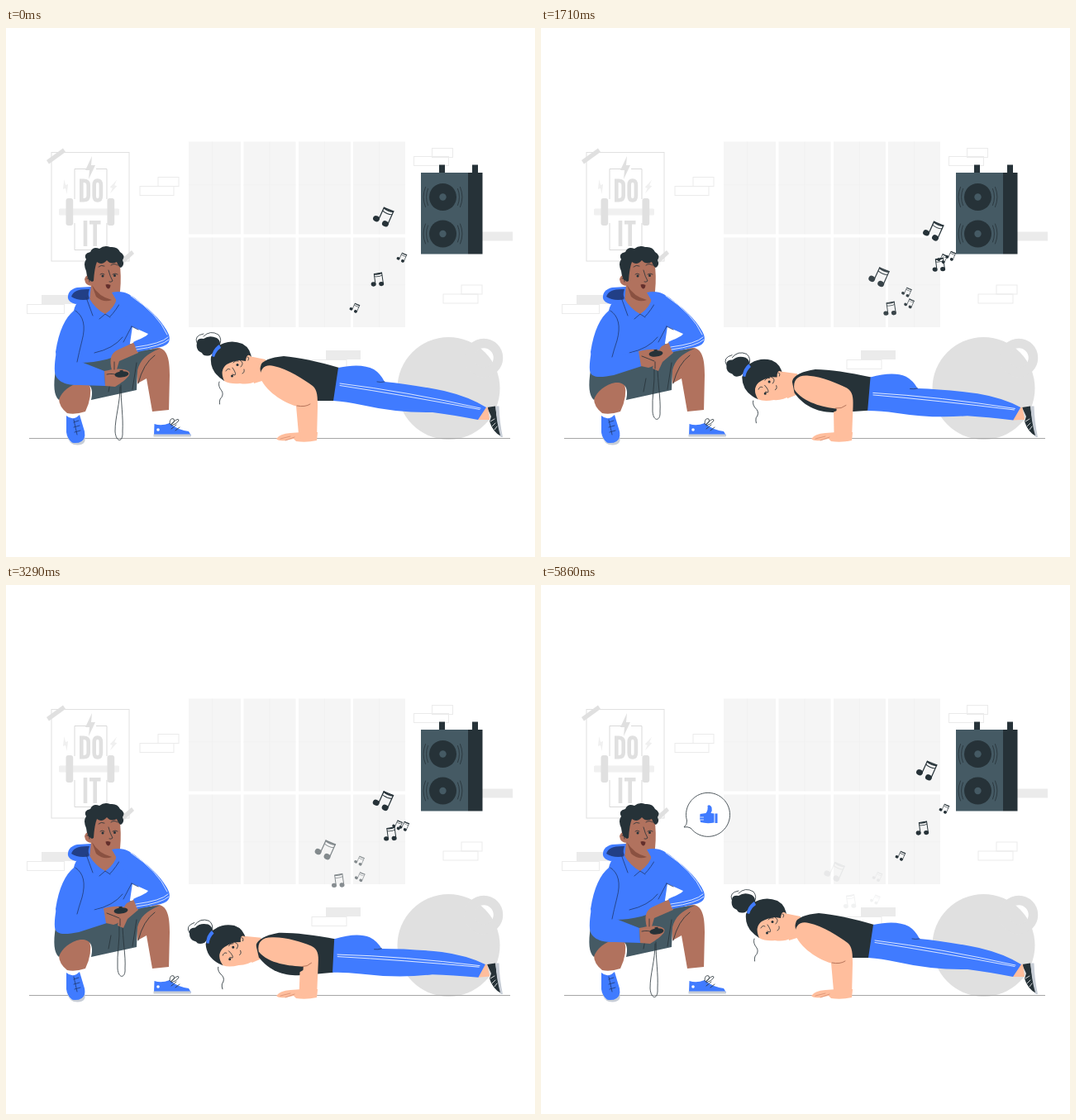
Recreate the animation shown at these times as an HTML page. Size 640x640 px, loop 5.93 s.

```html
<!DOCTYPE html>
<html lang="en">
<head>
<meta charset="utf-8">
<title>Push-ups</title>
<style>
html, body { margin: 0; width: 100%; height: 100%; overflow: hidden; background: #fff; }
svg { display: block; width: 100%; height: 100%; }
.line { fill: none; stroke: #263238; stroke-width: .8; stroke-linecap: round; stroke-linejoin: round; }
.navy { stroke: #20396f; }
.white { stroke: #fff; }
.brick { fill: none; stroke: #ebebeb; stroke-width: 1; }
.pale { fill: #ebebeb; }
.grey { fill: #e0e0e0; }
.dark { fill: #263238; }
.slate { fill: #455a64; }
.blue { fill: #407bff; }
.brown { fill: #b1725e; }
.skin { fill: #ffbe9d; }
.letters { fill: none; stroke: #e0e0e0; stroke-width: 4.6; }
</style>
</head>
<body>
<svg viewBox="0 0 640 640">
  <defs>
    <g id="note">
      <ellipse cx="-5" cy="6" rx="3.2" ry="2.8"/><ellipse cx="5" cy="6.2" rx="3.2" ry="2.8"/>
      <path d="M-2.6 6L-3.4-7L6.4-8L7.4 6" fill="none" stroke="#263238" stroke-width="1"/>
      <path d="M-3.8-7.6Q2-6.400 6.8-8.6V-7Q2-4.900-3.6-6.100ZM-3.3-4.1Q2-2.900 6.8-5V-4.200Q2-2.100-3.2-3.300Z"/>
    </g>
    <g id="cone">
      <circle r="16.5" class="dark"/><circle r="4.2" class="slate"/>
      <path class="line" d="M-18-10Q-22 0-18 10M18-10Q22 0 18 10M-21-12Q-26 0-21 12M21-12Q26 0 21 12"/>
    </g>
    <path id="bolt" d="M2-14L-6 3H-1L-2 14L6-3H1Z"/>
  </defs>

  <g id="window"></g>
  <g id="bricks"></g>

  <g id="poster">
    <rect x="55" y="150.500" width="94" height="131.500" fill="none" stroke="#e0e0e0"/>
    <path d="M83 207V170.500H97M109 170.500H122V207M83 236V268.500H122V236" fill="none" stroke="#d9d9d9"/>
    <path class="letters" d="M91.300 184.800H94Q99.700 184.800 99.700 190V203Q99.700 208.200 94 208.200H91.300ZM106.700 190Q106.700 184.500 110.800 184.500Q114.900 184.500 114.900 190V203Q114.900 208.500 110.800 208.500Q106.700 208.500 106.700 203ZM96 233V264M101 235.300H114.500M107.700 235.300V264"/>
    <use href="#bolt" x="102" y="169" class="grey"/>
    <g fill="#f0f0f0"><use href="#bolt" transform="translate(72 192) rotate(-18) scale(.65)"/><use href="#bolt" transform="translate(130 192) rotate(18) scale(.65)"/>
    <rect x="64" y="218.500" width="73" height="8" rx="1.500"/></g>
    <g class="grey"><rect x="72.500" y="206" width="8.700" height="33" rx="3"/><rect x="122.500" y="206" width="8.700" height="33" rx="3"/>
    <path d="M49 160L69 145.500L72 150L52 164.500ZM137 282L152 269L155 273L140 287Z"/></g>
  </g>

  <g class="grey">
    <circle cx="535.500" cy="436" r="62"/>
    <circle cx="578" cy="399" r="17.500" fill="none" stroke="#e0e0e0" stroke-width="11.500"/>
  </g>
  <path d="M28 496.500H610" stroke="#a6a6a6"/>

  <g id="speaker">
    <path class="dark" d="M524 165.500h7v11h-7zM564 165.500h7v11h-7zM559 175h17.500v98.500h-17.500z"/>
    <path class="slate" d="M502 175h57v98.500h-57z"/>
    <use href="#cone" x="528.500" y="204.500"/><use href="#cone" x="528.500" y="249"/>
  </g>
  <g id="notes" class="dark"></g>

  <g id="bubble">
    <path d="M176.500 285A26.500 26.500 0 1 1 181 294Q177 292 173 293Q177 290 176.500 285Z" fill="#fff" stroke="#263238" stroke-width=".8"/>
  </g>
  <g id="thumb" class="blue">
    <path d="M-10-1L-3-2Q0-6-1-11Q2-13 4-9Q5-5 3-2L7-1.500V9.500Q-2 11-9.500 9Q-11 4-10-1ZM8-1.500H11V10H8Z"/>
    <path class="line white" d="M-10 3H-6M-9.500 6H-6"/>
  </g>

  <g id="trainer">
    <path class="brown" d="M159 430L158 410C164 394 174 386 186 387C195 390 198 400 198 420L197 464H177L170 424Z"/>
    <path d="M177 464L197 462L199 481H179Z" fill="#fff"/>
    <path class="blue" d="M179.500 479Q188 482 198 478Q207 486 221 488L224 493H179Z"/>
    <path d="M178.500 491.500H223L224 494.500H178.500Z" fill="#c7cdd6"/>
    <circle cx="184" cy="486" r="1.800" fill="#fff"/>
    <path class="line" d="M198 479Q198 471 203 473Q205 477 199 480Q209 470 209 475Q207 479 200 481M200 485L206 480M205 487L210 483"/>
    <path d="M73 464L91 464L90 473L75 475Z" fill="#fff"/>
    <path class="blue" d="M73 469Q81 476 89 468L95 488Q97 499 89 502H80Q74 497 73 489Z"/>
    <path class="line navy" d="M82 477L88 475M82 483L89 481M83 489L90 487M82 474L86 492"/>
    <path d="M74 493Q77 502 82 502Q92 503 95.500 495Q97 504 87 504.500Q76 505 74 493Z" fill="#c7cdd6"/>
    <path class="brown" d="M66 440C76 426 94 424 101 430Q105 445 96 464Q84 468 74 466Q64 458 64 448Z"/>
    <path class="slate" d="M60 414L100 398L140 384Q154 378 160 390L186 388C170 394 162 402 159 414L158 438L103 450C107 434 100 428 90 429C78 431 67 440 64 450C58 445 57 432 60 414Z"/>
    <path class="line" d="M158 405L153 437M127 424L124 440M160 430Q166 406 180 396"/>
    <path class="blue" d="M103 319C91 324 84 332 82 342C72 350 64 366 60 392L64 410L88 405C112 405 135 399 149 388L153 361L146 321L130 319Z"/>
    <path class="blue" d="M75 327Q74 317 86 314L103 313L107 330L84 334Q76 332 75 327Z"/>
    <path d="M79 325Q82 315 101 316Q98 324 102 328Q88 331 79 325Z" fill="#223f86"/>
    <path class="brown" d="M103 310L101 331Q110 341 120 347Q129 340 134 332L131 320Z"/>
    <path class="blue" d="M100 326Q108 340 120 346L113 352Q101 344 100 326ZM134 327Q132 338 120 346L126 350Q135 343 134 327Z"/>
    <path class="line navy" d="M113 352L120 346L126 350M140 329Q133 342 126 349M97 326L105 348M107 393Q130 388 141 374"/>
    <path class="brown" d="M103 281L137 279Q140 300 138 319Q136 328 126 329Q113 328 104 312Q96 312 95 304Q97 297 103 300Z"/>
    <path d="M104 311Q112 325 128 329Q118 333 109 325Z" fill="#8a5141"/>
    <path class="dark" d="M104 307Q98 305 97 294Q93 285 97 280Q93 273 102 271Q105 264 113 267Q119 262 126 265Q135 264 138 271Q145 275 141 281Q144 287 139 290Q136 289 134 283Q127 287 122 281Q116 288 110 283Q107 290 106 306Z"/>
    <path class="line" d="M112 289Q115 286 119 288M127 287Q131 284 135 287M124 293Q126 301 129 306Q127 308 125 307M114 298Q116 296 119 298M129 298Q132 296 135 298M98 303Q101 302 101 307"/>
    <circle cx="117" cy="300" r="1.500" class="dark"/><circle cx="131.500" cy="299.500" r="1.500" class="dark"/>
    <path d="M120.500 310.500Q123 309.500 126.500 311Q126 315.500 123.500 315.500Q121 314.500 120.500 310.500Z" fill="#642f2c"/>

    <path id="cord" class="line"/>
    <path id="farSleeve" class="blue"/>
    <path id="sleeveFold" class="line navy"/>
    <path id="farHand" class="brown"/>
    <path id="nearHand" class="brown"/>
    <g id="watch"><ellipse rx="8.500" ry="3.600" class="dark"/><path class="dark" d="M-2-5H2V0H-2Z"/></g>
    <path id="fingers" class="line"/>
    <path class="blue" d="M128 320C142 317 150 322 160 330C176 342 191 357 197 371C200 380 195 384 187 386L159 392L154 380C162 376 169 374 172 370L152 361Z"/>
    <path class="line white" d="M151 324Q184 346 195 371M157 386Q188 382 196 374M158 389Q188 385 197 377"/>
    <path class="line navy" d="M152 361L142 380M152 361L160 365"/>
  </g>

  <g id="shoe">
    <path class="dark" d="M582 459L592 457.500Q594 474 599 494Q589 489 585 476L587 470Z"/>
    <path d="M592.500 457.500H596.500Q597 476 601 495H598.500Q593 476 592.500 457.500Z" fill="#c7cdd6"/>
    <path class="line white" d="M586 476L591 473M588 482L592 478M591 486L594 482"/>
  </g>
  <g id="body">
    <path class="skin" d="M571 459L583 459L585 474L571 474Z"/>
    <path class="skin" d="M294 397L314 401L316 425L300 430Z"/>
    <path class="dark" d="M307 409Q312 399 336 397Q362 399 403 411L397 451H364C342 451 322 445 309 424Z"/>
    <path class="blue" d="M402 411Q430 405 445 413Q453 418 458 428Q490 431 530 439Q560 446 581 459L571 474Q540 468 516 465Q475 466 430 456Q412 452 396 451Z"/>
    <path class="line white" d="M404 430Q485 440 574 460M404 432.500Q480 444 573 461.500"/>
    <path class="line navy" d="M458 428Q453 429 449 428"/>
    <g id="head">
      <path class="line" d="M239 373Q247 365 257 371Q262 377 258 384M231 381Q227 372 239 370M258 428Q256 433 261 439Q264 444 259 449Q258 452 258.500 455"/>
      <path class="dark" d="M247 396Q239 398 237 393Q229 390 231 381Q231 375 239 376Q246 371 255 375Q261 379 258 387Z"/>
      <path class="dark" d="M253 387Q269 375 286 382Q297 388 297 402L283 410L264 427Q246 416 248 398Z"/>
      <path class="skin" d="M264 427Q258 414 267 407Q274 403 283 402L290 403Q291 393 296 397Q301 403 309 406L303 427Q294 432 283 430Q271 431 264 427Z"/>
      <path d="M249 397Q250 388 258 383L260 387Q254 391 252 398Z" class="blue"/>
      <path class="line" d="M275 405Q277 402 281 403M266 415Q268 411 271 413M274 411Q279 418 277 420L274 419M286 418Q289 417 288 413M283 402Q289 405 284 410M292 398Q295 398 293 402"/>
      <circle cx="273.500" cy="421" r="1.500" class="dark"/><circle cx="280" cy="407.500" r="1.500" class="dark"/>
    </g>
  </g>
  <path id="backArm" class="skin"/>
  <path class="skin" d="M327 497Q331 491 344 490L358 489H377L376 499Q363 502 351 500L348 497L338 499Q330 500 327 497Z"/>
  <path id="frontArm" class="skin"/>
  <path id="elbow" class="line" style="stroke:#a2614a"/>
  <path class="line" style="stroke:#d78f70" d="M332 497L344 494M338 499L349 495"/>
</svg>
<script>
const LOOP = 5930, FRAMES = 83;
const $ = id => document.getElementById(id);
const NS = 'http://www.w3.org/2000/svg';

function add(parent, tag, attrs) {
  const el = document.createElementNS(NS, tag);
  for (const key in attrs) el.setAttribute(key, attrs[key]);
  return parent.appendChild(el);
}
const rect = (parent, x, y, width, height, attrs) => add(parent, 'rect', { x, y, width, height, ...attrs });

for (const x of [221, 287.5, 354, 420]) {
  for (const [y, h, bar] of [[137.5, 112, 190], [253.5, 108.5, 311]]) {
    rect($('window'), x, y, 63, h, { fill: '#f5f5f5' });
    add($('window'), 'path', { d: `M${x + 31.5 - (x < 230 ? 3 : 0)} ${y}v${h}M${x} ${bar}h63`, stroke: '#f0f0f0', 'stroke-width': .7 });
  }
}
for (const [x, y, w] of [[184, 180.5, 25], [162, 191.5, 41], [515.5, 145.5, 25], [493.5, 155.5, 42],
  [551, 311, 25], [529, 322, 42], [25.5, 334.5, 45], [370, 401.5, 42]]) rect($('bricks'), x, y, w, 11, { class: 'brick' });
for (const [x, y, w] of [[43, 323, 40], [387, 390, 42], [576, 246.5, 37]]) rect($('bricks'), x, y, w, 11, { class: 'pale' });

const clamp = v => Math.min(1, Math.max(0, v));
const ease = u => (1 - Math.cos(Math.PI * clamp(u))) / 2;

// Eased value from a table of [time, value] steps
function track(steps, t) {
  let value = steps[0][1];
  for (let i = 1; i < steps.length; i++) {
    const [t0, v0] = steps[i - 1], [t1, v1] = steps[i];
    if (t >= t0) value = v0 + (v1 - v0) * ease((t - t0) / (t1 - t0));
  }
  return value;
}

// Blend two paths that share the same commands
function morph(id, from, to, k) {
  const ends = to.match(/-?[\d.]+/g);
  let i = 0;
  $(id).setAttribute('d', from.replace(/-?[\d.]+/g, n => (+n + (ends[i++] - n) * k).toFixed(2)));
}

const dips = [[450, 0], [1010, 1], [1440, 0], [1985, 1], [2540, 0], [3110, 1], [3645, 0], [4180, 1], [4850, 0]];
const lifts = [[50, 0], [610, 1], [4900, 1], [5700, 0]];

const girlShapes = {
  frontArm: ['M308 424C306 412 314 406 324 409C342 413 360 425 371 433C377 438 377 447 377 458L376 498L357 499L353 458C340 455 316 442 308 424Z',
    'M305 450C303 438 309 432 324 432C340 431 356 434 369 438C377 441 379 447 378 457L376 498L357 499L362 463C345 463 318 464 305 450Z'],
  backArm: ['M351 457L354 491L368 494L370 456Z', 'M357 472L355 491L368 494L372 460Z'],
  elbow: ['M352 457Q362 459 368 455', 'M361 463Q365 463 370 458']
};
const trainerShapes = {
  farSleeve: ['M83 342C66 360 58 396 59 416C60 427 72 433 90 432L120 433L119 415L91 404L96 372Z',
    'M83 342C66 360 58 396 59 414C60 424 72 423 88 420L122 409L118 391L91 397L96 372Z'],
  sleeveFold: ['M84 342Q99 352 92 378Q88 394 86 404', 'M84 342Q99 352 92 378Q88 390 86 398'],
  farHand: ['M119 415C128 413 142 410 149 416C152 421 140 429 132 434L120 433Z',
    'M118 391C126 389 138 387 147 391C149 400 138 409 130 411L121 409Z'],
  nearHand: ['M158 379L136 389C126 393 125 402 128 414L134 413L137 403L160 393Z',
    'M158 379L146 385C142 390 137 400 135 412L142 415L147 404L160 393Z'],
  fingers: ['M131 404L131 413M122 419Q130 417 137 421', 'M138 404L138 412M122 397Q130 400 137 403'],
  cord: ['M138 434C138 455 132 470 132 488C133 502 142 502 141 488C142 470 139 455 139 432',
    'M137 412C138 430 134 445 135 464C136 477 145 476 144 464C145 448 141 430 141 408']
};

// x, y, drift x, drift y, size, angle
const stream = [
  [474, 245, -5.83, 4.93, 1.25, 28], [480, 287, -5.25, 4.7, .95, -4],
  [485, 279, -3.83, 3.6, .62, 28], [495, 276, -4.45, 5.1, .62, 28]
];
const PACE = 1.85;
const bursts = [4, 11, 18, 24.1, 30.8, 37.9, 44.4, 53.2, 58.5, 65, 71];
// x, y, drift x, drift y, size, angle, first frame relative to the last one
const finale = [
  [467, 223, -10, 4, 1.25, 28, -2], [461, 294, -12, 10, .95, -4, -3],
  [488, 270, -9, 7, .62, 28, -1], [435, 327, -13, 11, .62, 28, -5]
];
const pool = Array.from({ length: 16 }, () => add($('notes'), 'use', { href: '#note' }));

function drawNotes(frame) {
  let used = 0;
  const put = ([x, y, dx, dy, size, angle], step, opacity) => {
    const el = pool[used++];
    el.setAttribute('transform', `translate(${x + dx * step} ${y + dy * step}) rotate(${angle}) scale(${size})`);
    el.setAttribute('opacity', opacity);
  };
  for (const start of bursts) {
    const step = PACE * (frame - start);
    if (step > -5 && step < 21) {
      const opacity = Math.min(clamp((step + 5) / 4), clamp((21 - step) / 11));
      for (const note of stream) put(note, step, opacity);
    }
  }
  const tail = frame > FRAMES / 2 ? frame - 82 : frame + 1;
  for (const note of finale) {
    const age = tail - note[6];
    if (age >= 0 && age < 12) put(note, tail, clamp((12 - age) / 5));
  }
  while (used < pool.length) pool[used++].setAttribute('opacity', 0);
}

function draw(now) {
  const frame = Math.floor(now % LOOP * FRAMES / LOOP + .1) % FRAMES;
  const t = frame * LOOP / FRAMES;

  const dip = track(dips, t);
  $('body').setAttribute('transform', `rotate(${-7.3 * dip} 580 470)`);
  $('head').setAttribute('transform', `rotate(${-6 * dip} 300 418)`);
  for (const id in girlShapes) morph(id, ...girlShapes[id], dip);

  const lift = track(lifts, t);
  for (const id in trainerShapes) morph(id, ...trainerShapes[id], lift);
  $('watch').setAttribute('transform', `translate(${140 - lift} ${419 - 25 * lift}) rotate(-6)`);

  const tilt = 1 - ease((t - 4080) / 320);
  const pop = ease((t - 3900) / 160);
  $('thumb').setAttribute('transform', `translate(${202.5 + 5.5 * tilt} ${278 - 11 * tilt}) rotate(${25 * tilt}) scale(${pop})`);
  $('bubble').setAttribute('opacity', ease((t - 4090) / 300));

  drawNotes(frame);
}

const began = performance.now();
function tick() {
  draw(performance.now() - began);
  requestAnimationFrame(tick);
}
tick();
</script>
</body>
</html>
```
